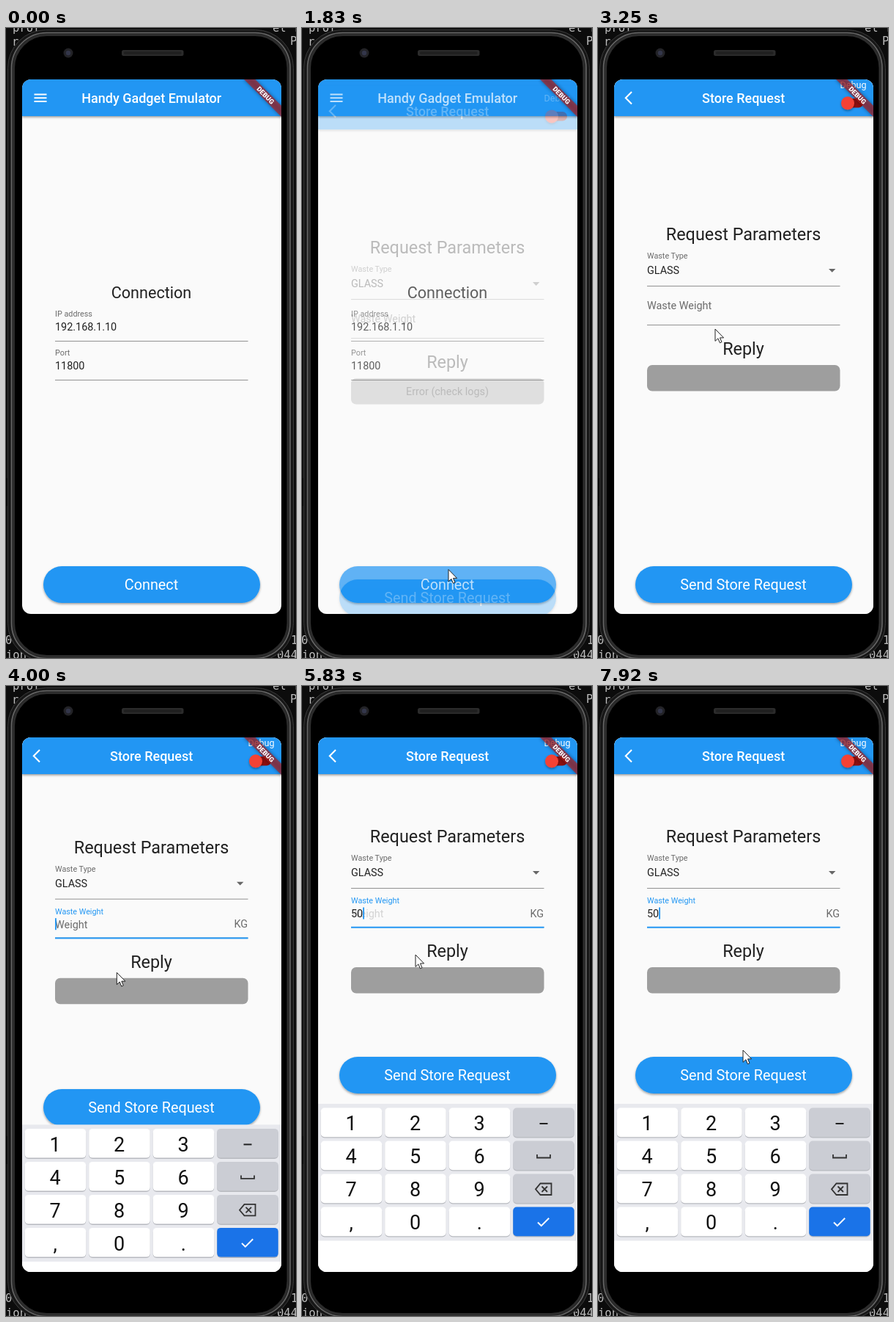
An HTML page that plays this animation: 396 by 858 pixels, repeating every 8000 ms.

```html
<!DOCTYPE html>
<html lang="en">
<head>
<meta charset="utf-8">
<title>Store request</title>
<style>
html, body { margin: 0; width: 100%; height: 100%; overflow: hidden; background: #0c0c0c; }
svg { display: block; width: 396px; height: 858px; font-family: Roboto, sans-serif; }
.mono { font-family: "DejaVu Sans Mono", monospace; }
</style>
</head>
<body>
<svg id="stage" viewBox="0 0 396 858"></svg>
<script>
const BLUE = '#2196f3', INK = '#212121', GREY = '#6b6b6b';
const LOOP = 8000, OPEN = 1670, CLEAR = 2500, FOCUS = 3750, TYPE_1 = 5670, TYPE_2 = 5820;

// y is the middle of the capital letters
const text = (s, x, y, size, fill = INK, anchor = 'start', extra = '') =>
  `<text x="${x}" y="${y + size * .356}" font-size="${size}" fill="${fill}" text-anchor="${anchor}" ${extra}>${s}</text>`;
const rect = (x, y, w, h, fill, rx = 0, extra = '') =>
  `<rect x="${x}" y="${y}" width="${w}" height="${h}" rx="${rx}" fill="${fill}" ${extra}/>`;
const path = (d, stroke, width = 2, extra = '') =>
  `<path d="${d}" fill="none" stroke="${stroke}" stroke-width="${width}" ${extra}/>`;
const group = (id, body, extra = '') => `<g id="${id}" ${extra}>${body}</g>`;

const appBar = (title, icon) =>
  rect(22, 60, 354, 60, BLUE, 0, 'filter="url(#shadow)"') + icon +
  text(title, 198.7, 95.5, 18, '#fff', 'middle', 'font-weight="500"');
const button = label =>
  rect(51, 733, 296, 50, BLUE, 25, 'filter="url(#shadow)"') +
  text(label, 198.5, 757.5, 19.8, '#fff', 'middle');
const underline = y => rect(67, y, 263.5, 1, '#929292');
const field = (label, value, y) =>
  text(label, 67, y, 10.8, GREY) + text(value, 67, y + 18, 14.4) + underline(y + 37);

const connectPage = rect(22, 70, 354, 728, '#fafafa') +
  text('Connection', 198.5, 360, 21.6, INK, 'middle') +
  field('IP address', '192.168.1.10', 389) +
  field('Port', '11800', 442) +
  button('Connect') +
  appBar('Handy Gadget Emulator', path('M38.5 90.5h17M38.5 95.3h17M38.5 100h17', '#fff', 1.9));

const form =
  text('Request Parameters', 198.5, 280.5, 23.4, INK, 'middle') +
  text('Waste Type', 67, 310, 10.8, GREY) + text('GLASS', 67, 330, 14.4) +
  '<path d="M315 328h9.4l-4.7 4.8z" fill="#666"/>' + underline(351) + underline(404) +
  rect(67, 403.7, 263.5, 2, BLUE, 0, 'id="focusLine"') +
  group('label', text('Waste Weight', 0, 0, 14.4, 'inherit')) +
  text('Weight', 67, 386, 14.4, GREY, 'start', 'id="hint"') +
  text('KG', 330, 385.5, 14.4, GREY, 'end', 'id="unit"') +
  text('', 67, 385.5, 14.4, INK, 'start', 'id="value"') +
  rect(0, 377.5, 1.8, 16, BLUE, 0, 'id="caret"') +
  text('Reply', 198.5, 436.5, 23.4, INK, 'middle') +
  rect(67, 459, 263.5, 35.5, '#9e9e9e', 7) +
  text('Error (check logs)', 198.5, 477, 14.4, INK, 'middle', 'id="error"');

const debugSwitch = text('Debug', 330.5, 77.5, 12.6, '#fff') +
  rect(335, 96, 27, 12.5, '#8d0f10', 6.2) +
  '<circle cx="341" cy="102.3" r="9" fill="#f44336" filter="url(#shadow)"/>';

const storePage = rect(22, 70, 354, 728, '#fafafa') +
  group('form', form) + group('send', button('Send Store Request')) +
  appBar('Store Request', path('M46 87l-8.2 8.2 8.2 8.2', '#fff', 2.1)) + debugSwitch;

function keyboard() {
  const digits = ['1', '2', '3', '4', '5', '6', '7', '8', '9', ',', '0', '.'];
  let out = rect(22, 569, 354, 187, '#e8e9ee') + rect(22, 755.5, 354, 43, '#fff');
  for (let row = 0; row < 4; row++) {
    for (let col = 0; col < 4; col++) {
      const x = 25.7 + col * 87.5, y = 574.5 + row * 45;
      const fill = col < 3 ? '#fff' : row < 3 ? '#cbcdd4' : '#1a73e8';
      out += rect(x, y + 1, 83.5, 40, '#b7b9bf', 5) + rect(x, y, 83.5, 39.7, fill, 5);
      if (col < 3) out += text(digits[row * 3 + col], x + 41.5, y + 21.2, 27, '#111', 'middle');
    }
  }
  return out + path('M324.5 596h11', '#222', 2) +
    path('M321 638v4.5h18v-4.5', '#333', 1.8) +
    path('M325.5 677.5h15v15.5h-15l-6.5-7.7zM327.5 681.5l7.5 7.5m0-7.5l-7.5 7.5', '#333', 1.8) +
    path('M322 730.5l4.8 4.7 10.4-10.4', '#fff', 2);
}

const banner = `<g transform="translate(376 70) rotate(45)">` +
  rect(-36, 25.2, 72, 10.8, '#000', 0, 'opacity=".4" filter="url(#blur)"') +
  rect(-36, 25.2, 72, 10.8, '#b71c1c', 0, 'opacity=".63"') +
  text('DEBUG', 0, 30.6, 9.2, '#fff', 'middle', 'font-weight="900"') + '</g>';

const terminal = `<g class="mono">` +
  text('prof', 9, -1, 15.5, '#bbb') + text('r', 8, 18, 15.5, '#bbb') +
  text('el f', 364, -1, 15.5, '#bbb') + text('P', 388, 17, 15.5, '#bbb') +
  text('0', -1, 833, 15.5, '#bbb') + text('ion', 0, 853, 15.5, '#bbb') +
  text('1', 389, 833, 15.5, '#bbb') + text('044', 370, 853, 15.5, '#bbb') + '</g>';

const phone =
  rect(2.5, 2.5, 390, 860, '#171717', 52, 'stroke="#3c3c3c"') +
  rect(7.5, 6.5, 380.5, 852, '#202020', 48, 'stroke="#686868" stroke-width="1.6"') +
  rect(10.5, 9.5, 374.5, 846, '#000', 45, 'stroke="#2c2c2c" stroke-width="3"') +
  '<circle cx="85" cy="34" r="6.5" fill="#232327"/><circle cx="85" cy="34" r="3.2" fill="#33364a"/>' +
  rect(158, 30, 84.5, 8, '#2b2b2b', 2.5) + rect(161, 32, 78.5, 4, '#202020', 1.5);

const stage = document.getElementById('stage');
stage.innerHTML = `<defs>
  <filter id="shadow" x="-20%" y="-20%" width="140%" height="150%">
    <feDropShadow dx="0" dy="1.6" stdDeviation="1.5" flood-opacity=".38"/></filter>
  <filter id="blur" x="-20%" y="-100%" width="140%" height="300%"><feGaussianBlur stdDeviation="2.5"/></filter>
  <clipPath id="glass">${rect(22, 70, 354, 728, '#fff', 12)}</clipPath></defs>` +
  rect(0, 0, 396, 858, '#0c0c0c') + terminal + rect(0, 613, 2, 38, '#000') + phone +
  group('screen', connectPage + group('store', storePage) + group('keys', keyboard()) + banner,
    'clip-path="url(#glass)"') +
  group('pointer', '<path d="M0 0V16.4L3.9 12.8L6.4 18.8L9 17.7L6.5 11.9H11.6Z" fill="#fff" stroke="#222"/>');

const el = Object.fromEntries([...stage.querySelectorAll('[id]')].map(e => [e.id, e]));
const clamp = v => Math.min(1, Math.max(0, v));
const span = (t, start, length) => clamp((t - start) / length);
const smooth = p => p * p * (3 - 2 * p);
const easeOut = p => 1 - (1 - p) ** 3;
const mix = (a, b, p) => a + (b - a) * p;
const move = (e, x, y) => e.setAttribute('transform', `translate(${x} ${y})`);
const fade = (e, value) => e.setAttribute('opacity', value);

// time, x, y
const route = [
  [500, 216, 862], [1250, 203, 753], [1750, 203, 753], [2170, 172, 593], [2500, 172, 593],
  [3250, 160, 410], [3600, 153, 384], [3800, 153, 384], [4170, 150, 395], [4250, 150, 395],
  [4920, 155, 366], [6330, 155, 366], [6670, 193, 457], [6830, 193, 457], [7920, 198, 496]
];
function pointerAt(t) {
  const next = route.findIndex(stop => stop[0] > t);
  if (next === 0) return [216, 862];
  if (next < 0) return route.at(-1).slice(1);
  const [a, b] = [route[next - 1], route[next]];
  const p = smooth(span(t, a[0], b[0] - a[0]));
  return [mix(a[1], b[1], p), mix(a[2], b[2], p)];
}

function draw(t) {
  const opening = span(t, OPEN, 300);
  fade(el.store, opening ** 2);
  move(el.store, 0, 182 * (1 - easeOut(opening)));
  fade(el.error, t < CLEAR ? 1 : 0);

  const rise = easeOut(span(t, FOCUS, 500)), layout = easeOut(span(t, FOCUS + 40, 500));
  move(el.keys, 0, 230 * (1 - rise));
  move(el.form, 0, -76 * layout);
  move(el.send, 0, -228 * layout);

  const focused = t >= FOCUS, lift = smooth(span(t, FOCUS, 200));
  el.label.setAttribute('transform', `translate(67 ${mix(378, 368, lift)}) scale(${mix(1, .75, lift)})`);
  el.label.setAttribute('fill', focused ? BLUE : GREY);
  fade(el.focusLine, lift);
  fade(el.unit, lift);
  fade(el.hint, lift * (1 - span(t, TYPE_1, 220)));

  const typed = t < TYPE_1 ? '' : t < TYPE_2 ? '5' : '50';
  if (el.value.textContent !== typed) el.value.textContent = typed;
  const lastInput = t >= TYPE_2 ? TYPE_2 : t >= TYPE_1 ? TYPE_1 : FOCUS;
  el.caret.setAttribute('x', 67 + typed.length * 8.1);
  fade(el.caret, focused && (t - lastInput) % 1000 < 500 ? 1 : 0);

  move(el.pointer, ...pointerAt(t));
}

function tick() {
  draw(performance.now() % LOOP);
  requestAnimationFrame(tick);
}
tick();
</script>
</body>
</html>
```
